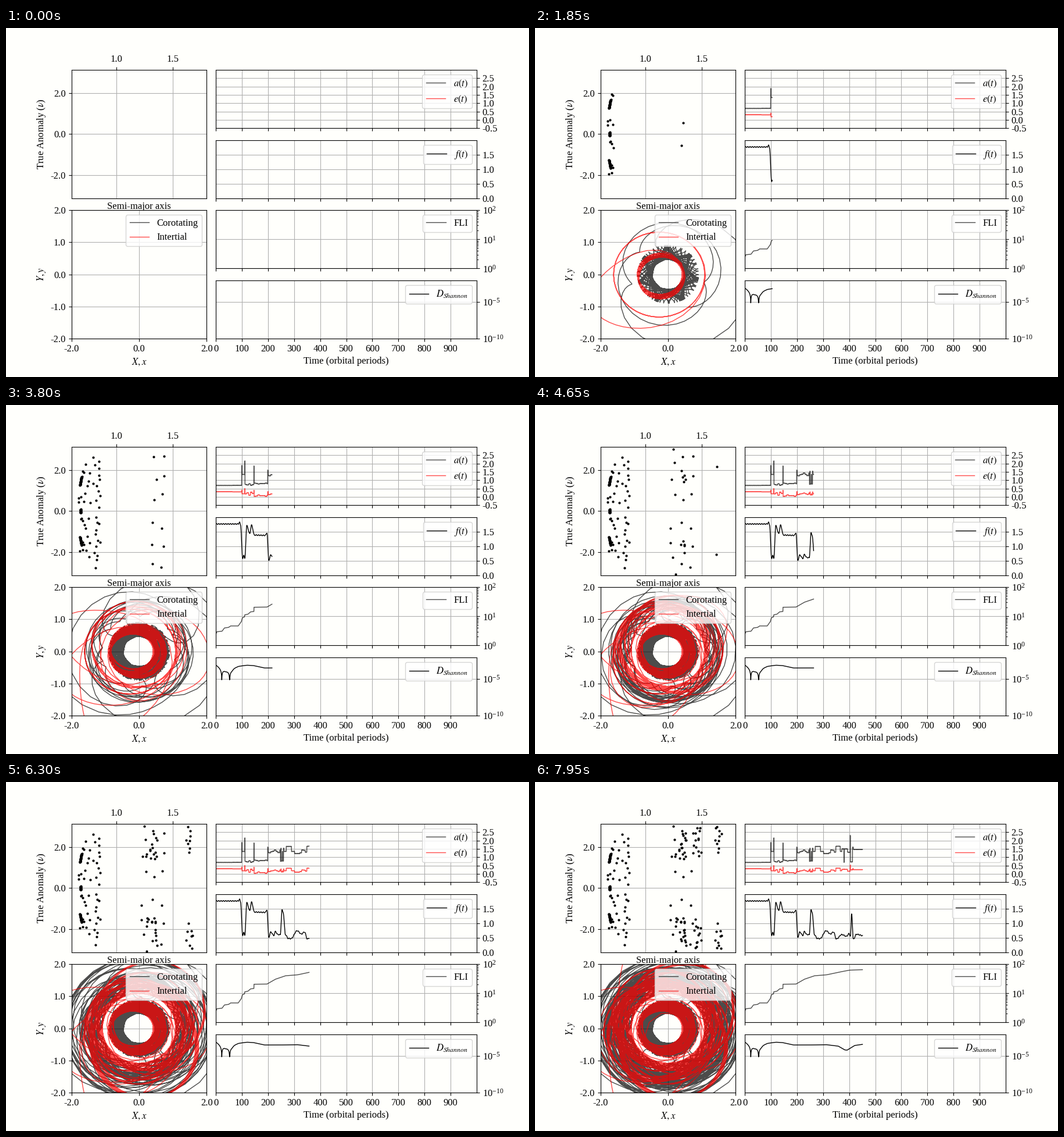
A matplotlib script for the animation above (8 s loop, 900 by 600 pixels).

```python
import numpy as np
import matplotlib.pyplot as plt
from matplotlib.animation import FuncAnimation
from matplotlib.ticker import NullFormatter

plt.rcParams.update({
    "font.family": "Liberation Serif",
    "font.size": 12,
    "mathtext.fontset": "stix",
    "axes.unicode_minus": False,
})

W, H, DPI = 900, 600, 100
FRAMES, INTERVAL = 160, 50
RATE = 2.838          # orbital periods per frame
DT = 0.05             # sampling of the trajectory
SKIP = 5              # coarser sampling for the time series
PAPER = "#fffffc"

# (start time, semi-major axis): the particle hops between these states
STATES = np.array([
    (0, .6887), (64, .693), (99.3, 1.88), (100.3, 1.35), (111, 2.16),
    (111.9, .75), (118, .72), (126, .79), (133, .70), (139, .74),
    (146, 1.85), (146.8, .80), (199, 1.60), (201, 1.33), (248, .75),
    (249.6, 1.55), (250.6, .78), (255, 1.35), (256, .78), (259.6, 1.55),
    (260.6, 1.35), (270, 1.65), (290, 1.35), (302, 1.22), (322, 1.33),
    (349, 1.66), (366, 1.35), (372, 1.50), (380, .70), (381.2, 1.50),
    (394, 1.30), (404, 2.30), (405.2, .72), (413, 1.60), (416, 1.47),
])

# (time, frequency ratio), eased between the points
FREQ = np.array([
    (0, 1.76), (86, 1.76), (91, 1.82), (95, 1.72), (103, .57), (107, .70),
    (111, .57), (119, 1.70), (130, 1.43), (137, 1.72), (148, 1.38),
    (190, 1.37), (196, 1.46), (203, .52), (211, .70), (222, .58),
    (229, .72), (236, .62), (247, .60), (254, 1.45), (258, 1.38),
    (267, .61), (277, .48), (288, .47), (312, .74), (328, .63), (340, .70),
    (351, .46), (372, .61), (390, .55), (399, .64), (405, .56),
    (409.5, 1.32), (416, .45), (428, .62), (455, .57),
])

# (time, log10 of the chaos indicator)
FLI = np.array([
    (0, .385), (4, .47), (24, .49), (33, .60), (49, .62), (57, .67),
    (86, .67), (98, .82), (102, .95), (110, .98), (111, 1.05), (123, 1.07),
    (133, 1.15), (146, 1.165), (146.5, 1.31), (196, 1.315), (228, 1.48),
    (267, 1.60), (312, 1.63), (354, 1.71), (399, 1.79), (455, 1.81),
])

# (time, log10 of the diffusion estimate) without its two cusps
DIFF = np.array([
    (0, -2.80), (38, -3.50), (62, -3.46), (71, -3.23), (87, -3.06),
    (120, -2.98), (145, -3.06), (187, -3.41), (265, -3.43), (312, -3.40),
    (358, -3.60), (383, -4.12), (392, -4.16), (421, -3.52), (455, -3.35),
])
CUSPS = (23, 53)

# (start, end, count, semi-major axis, first and last anomaly)
SWEEPS = [
    (66, 98, 4, .69, .4, .6), (66, 98, 4, .69, 1.6, 2.0),
    (100, 111, 3, 1.335, .58, 2.6), (112, 145, 6, .75, .4, 2.25),
    (147, 198, 12, .825, .25, 2.7), (199, 214, 3, 1.40, 2.7, .8),
    (217, 246, 4, 1.25, .9, 3.0), (225, 300, 8, 1.345, 1.4, 2.7),
    (262, 300, 5, 1.645, 2.2, 3.0), (313, 345, 5, 1.29, 1.5, 1.8),
    (349, 366, 5, 1.65, 1.7, 3.0), (366, 398, 7, 1.47, 1.6, 2.9),
    (402, 450, 5, 1.33, 2.0, 2.7), (416, 450, 5, 1.45, 1.8, 3.0),
]


def ease(t, pts):
    """Cosine interpolation through the points."""
    x, y = pts.T
    i = np.clip(np.searchsorted(x, t, "right") - 1, 0, len(x) - 2)
    u = (t - x[i]) / (x[i + 1] - x[i])
    return y[i] + (y[i + 1] - y[i]) * (1 - np.cos(np.pi * u)) / 2


def smooth(v, width=10):
    kernel = np.hanning(2 * width + 3)[1:-1]
    padded = np.pad(v, width, mode="edge")
    return np.convolve(padded, kernel / kernel.sum(), "valid")


def semi_major(t):
    """Stepped semi-major axis; the two long stays wander in blocks."""
    a = STATES[np.searchsorted(STATES[:, 0], t, "right") - 1, 1]
    block = (t // 7).astype(int)
    noise = np.random.default_rng(4).uniform(-1, 1, block[-1] + 1)[block]
    return a + noise * np.where(a == 1.33, .11, np.where(a == .8, .03, 0))


def eccentricity(a):
    inner = np.clip(.31 - 2.1 * (a - .69), .04, .35)
    return np.where(a < 1, inner, 1 - 1.09 / np.maximum(a, 1.1))


def apsis(t, a):
    """Direction of the pericentre, new after every hop."""
    hop = np.cumsum(np.diff(a, prepend=a[0]) != 0)
    w = np.random.default_rng(8).uniform(-np.pi, np.pi, hop[-1] + 1)[hop]
    w = np.where(t < 111, 0, np.where(t < 199, .3 * w, w))
    w[a == 1.65] = 1.75
    wobble = np.where((t > 64) & (t < 98), .5 * np.sin((t - 64) / 11), 0)
    drift = .012 * (t % 20) * (t > 112)
    return w + wobble + drift + .03 * np.sin(t / 5)


def orbit(t, a, w):
    """Kepler motion in the fixed and in the corotating frame."""
    e = eccentricity(a)
    a = smooth(a)
    k, h = smooth(e * np.cos(w)), smooth(e * np.sin(w))
    e, w = np.hypot(k, h), np.arctan2(h, k)
    lon = np.pi + 2 * np.pi * np.cumsum(a ** -1.5) * DT + .04 * np.sin(t / 3)
    mean = lon - w
    ecc = mean + e * np.sin(mean)
    for _ in range(5):
        ecc -= (ecc - e * np.sin(ecc) - mean) / (1 - e * np.cos(ecc))
    z = a * (np.cos(ecc) - e + 1j * np.sqrt(1 - e * e) * np.sin(ecc))
    z = z * np.exp(1j * w)
    return z, z * np.exp(-2j * np.pi * t)


def section_dots():
    """Rows of time, semi-major axis, true anomaly, sorted by time."""
    rng = np.random.default_rng(5)
    rows = []
    for k in range(80):
        c = (1.58, -1.36, 0, 1.36, -1.58)[k % 5]
        nu = c + .085 * np.sin(1.7 * k)
        a = .682 + .004 * np.sin(2.3 * k) if c == 0 else \
            .676 + .035 * (abs(nu) - 1.25)
        rows.append((1.1 * k + .5, a, nu))
    for t0, t1, n, a, nu0, nu1 in SWEEPS:
        for t, nu in zip(np.linspace(t0, t1, n), np.linspace(nu0, nu1, n)):
            for sign in (1, -1):
                da, dn = rng.uniform(-1, 1, 2) * (.03, .1)
                rows.append((t, a + da, sign * (nu + dn)))
    return np.array(sorted(rows))


# ---- data ----
t = np.arange(0, RATE * FRAMES, DT)
a = semi_major(t)
fixed, rotating = orbit(t, a, apsis(t, a))

ts = t[::SKIP]
ripple = np.sin(2 * np.pi * ts / 3.1)
a_ts = a[::SKIP] + .012 * ripple
e_ts = eccentricity(a[::SKIP]) - .01 * ripple
f_ts = ease(ts, FREQ) + .015 * np.sin(2 * np.pi * ts / 9)
fli_ts = 10 ** np.interp(ts, *FLI.T)
d_log = np.interp(ts, *DIFF.T)
for c in CUSPS:
    gap = np.abs(ts - c) + .02
    d_log += np.log10(gap / (gap + 12))
d_ts = 10 ** np.maximum(d_log, -5.1)
dots = section_dots()

# ---- layout ----
fig = plt.figure(figsize=(W / DPI, H / DPI), dpi=DPI, facecolor=PAPER)


def panel(x0, x1, y0, y1):
    """Axes from pixel edges, y counted from the top."""
    ax = fig.add_axes([x0 / W, 1 - y1 / H, (x1 - x0) / W, (y1 - y0) / H],
                      facecolor=PAPER)
    ax.grid(True)
    return ax


def ticks(axis, values, fmt="%.1f"):
    axis.set_ticks(values, [fmt % v for v in values])


LEFT, RIGHT = (112.5, 345.3), (361, 810)
ROW, STEP, TOP = 100.43, 120.52, 72

sec = panel(*LEFT, TOP, TOP + STEP + ROW)
sec.set(xlim=(.6, 1.8), ylim=(-np.pi, np.pi),
        xlabel="Semi-major axis", ylabel=r"True Anomaly ($\nu$)")
sec.xaxis.tick_top()
ticks(sec.xaxis, [1, 1.5])
ticks(sec.yaxis, [-2, 0, 2])

orb = panel(*LEFT, TOP + 2 * STEP, 534)
orb.set(xlim=(-2, 2), ylim=(-2, 2), xlabel="$X,x$", ylabel="$Y,y$")
ticks(orb.xaxis, [-2, 0, 2])
ticks(orb.yaxis, range(-2, 3))

series = []
for i in range(4):
    ax = panel(*RIGHT, TOP + i * STEP, TOP + i * STEP + ROW)
    ax.set_xlim(0, 1000)
    ticks(ax.xaxis, range(0, 1000, 100), "%d")
    ax.yaxis.tick_right()
    ax.tick_params(labelbottom=i == 3)
    series.append(ax)
el, fr, fl, di = series
el.set_ylim(-.5, 3)
ticks(el.yaxis, np.arange(-.5, 2.6, .5))
fr.set_ylim(0, 2)
ticks(fr.yaxis, np.arange(0, 2, .5))
fl.set_yscale("log")
fl.set_ylim(1, 100)
fl.set_yticks([1, 10, 100])
fl.yaxis.set_minor_formatter(NullFormatter())
di.set_yscale("log")
di.set_ylim(1e-10, 1e-2)
di.set_yticks([1e-10, 1e-5])
di.minorticks_off()
di.set_xlabel("Time (orbital periods)")


def curve(ax, label, color="k", alpha=1):
    return ax.plot([], [], color=color, alpha=alpha, lw=1, label=label)[0]


rot_line = curve(orb, "Corotating", alpha=.7)
fix_line = curve(orb, "Intertial", "r", .7)
graphs = [
    (curve(el, "$a(t)$", alpha=.7), a_ts),
    (curve(el, "$e(t)$", "r", .7), e_ts),
    (curve(fr, "$f(t)$"), f_ts),
    (curve(fl, "FLI", alpha=.7), fli_ts),
    (curve(di, "$D_{Shannon}$"), d_ts),
]
dot_line, = sec.plot([], [], "k.", ms=4)
for ax in (orb, *series):
    ax.legend(loc="upper right")


def draw(frame):
    now = RATE * frame
    n = np.searchsorted(t, now)
    m = np.searchsorted(ts, now)
    d = np.searchsorted(dots[:, 0], now)
    rot_line.set_data(rotating.real[:n], rotating.imag[:n])
    fix_line.set_data(fixed.real[:n], fixed.imag[:n])
    for line, values in graphs:
        line.set_data(ts[:m], values[:m])
    dot_line.set_data(dots[:d, 1], dots[:d, 2])
    return [rot_line, fix_line, dot_line, *(g[0] for g in graphs)]


anim = FuncAnimation(fig, draw, frames=FRAMES, interval=INTERVAL,
                     init_func=lambda: draw(0), repeat=True)
plt.show()
```
